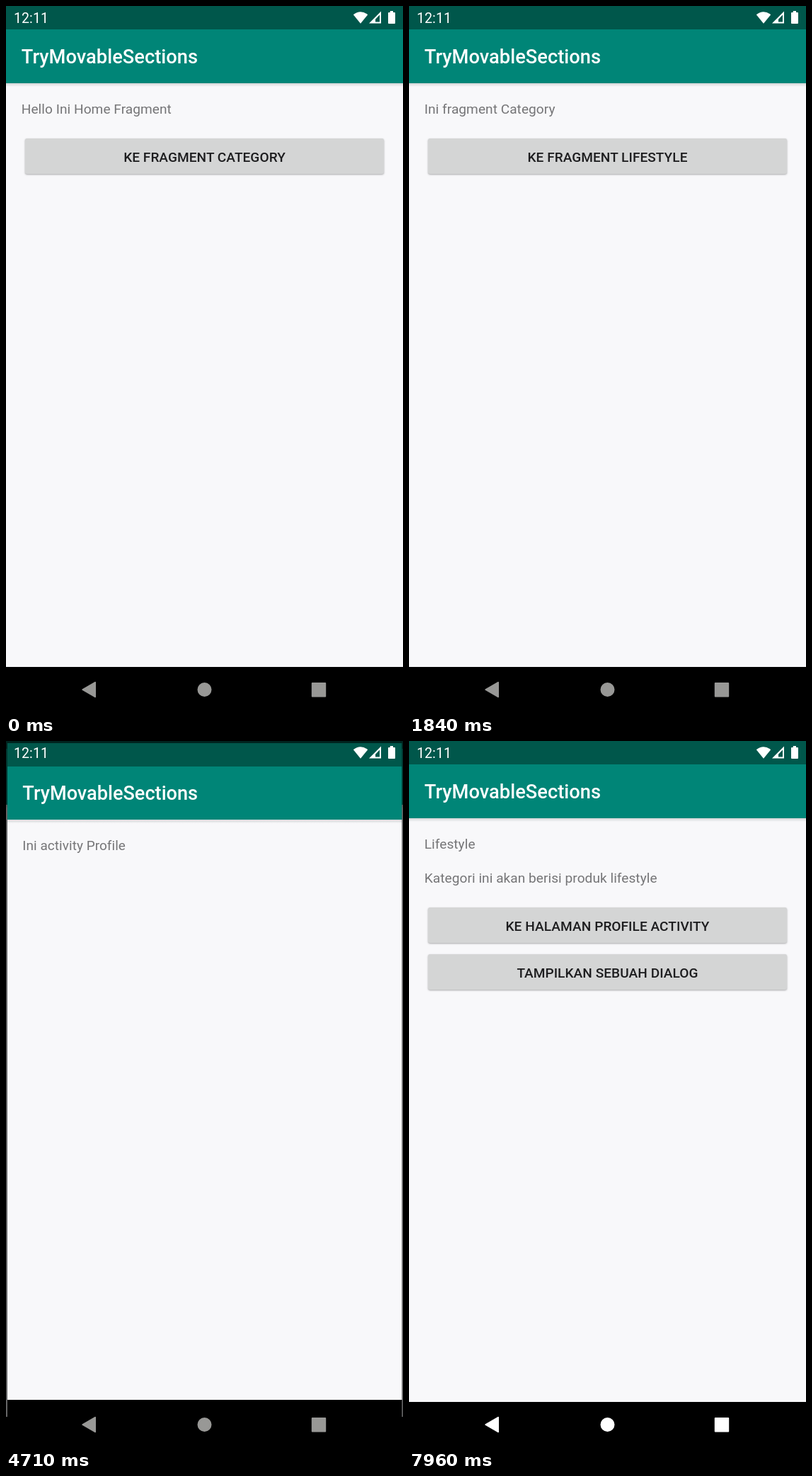
Animation, 561 px wide and 998 px high, one loop 8 s. Source, as an HTML page:

```html
<!DOCTYPE html>
<html lang="id">
<head>
<meta charset="utf-8">
<title>Fragment demo</title>
<style>
  html, body { margin: 0; width: 100%; height: 100%; overflow: hidden; background: #000; }
  .stage {
    position: relative; width: 561px; height: 998px; overflow: hidden; background: #000;
    font: 400 19.09px/26px Roboto, sans-serif; letter-spacing: .05px; color: #757577;
  }
  .stage * { position: absolute; box-sizing: border-box; margin: 0; white-space: nowrap; }

  /* App windows: status bar, app bar, content and navigation bar as one backdrop */
  .window {
    inset: 0;
    background: linear-gradient(#00574b 33px, #008577 0 109px, #f8f8fa 0 933px, #000 0);
  }
  .bar {
    left: 0; top: 33px; width: 100%; height: 76px; padding-left: 21.8px;
    color: #fff; font-weight: 500; font-size: 27.27px; line-height: 78px; letter-spacing: 0;
  }
  .bar::after {
    content: ""; position: absolute; left: 0; top: 100%; width: 100%; height: 5px;
    background: linear-gradient(rgba(0, 0, 0, .14), transparent);
  }
  .page { inset: 0; }
  p { left: 21.8px; top: 132.5px; }
  .second { top: 181px; }

  .button {
    left: 26.8px; top: 187px; width: 507.4px; height: 50px; border-radius: 2.7px;
    background: #d4d5d5; color: #1d1d1f; font-weight: 500; line-height: 53px; text-align: center;
    box-shadow: 0 1px 2.5px rgba(0, 0, 0, .32);
  }
  .button span { inset: 0; }
  .clip { inset: 0; overflow: hidden; border-radius: inherit; }
  .ripple {
    left: 50%; top: 50%; width: 518px; height: 518px; margin: -259px 0 0 -259px;
    border-radius: 50%; background: rgba(0, 0, 0, .14); opacity: 0;
  }

  /* Every animation shares one 8 s loop; --t shifts the press effects to their tap */
  .tap { animation: lift 8s linear calc(var(--t) - 8s) infinite; }
  .tap .ripple {
    animation: grow 8s linear calc(var(--t) - 8s) infinite,
               glow 8s linear calc(var(--t) - 8s) infinite;
  }
  @keyframes lift {
    0%, 6%, 100% { box-shadow: 0 1px 2.5px rgba(0, 0, 0, .32); }
    1.5%, 4% { box-shadow: 0 2px 6px rgba(0, 0, 0, .36); }
  }
  @keyframes grow {
    0% { translate: -80px 0; scale: 0; animation-timing-function: cubic-bezier(0, 0, .2, 1); }
    2.8125%, 100% { translate: 0 0; scale: 1; }
  }
  @keyframes glow {
    0%, 6.25%, 100% { opacity: 0; }
    .94%, 3.75% { opacity: 1; }
  }

  .home { animation: home 8s step-end infinite; }
  .category { animation: category 8s step-end infinite; }
  .lifestyle { animation: lifestyle 8s step-end infinite; }
  @keyframes home { 0% { visibility: visible; } 20.25%, 100% { visibility: hidden; } }
  @keyframes category {
    0% { visibility: hidden; } 20.25% { visibility: visible; } 40.25%, 100% { visibility: hidden; }
  }
  @keyframes lifestyle { 0% { visibility: hidden; } 40.25%, 100% { visibility: visible; } }

  /* Activity opens at 4496 ms and closes at 6360 ms */
  .main { animation: recede 8s linear infinite; }
  .shade { inset: 0; background: #000; opacity: 0; animation: shade 8s linear infinite; }
  .profile { opacity: 0; animation: zoom 8s linear infinite, fade 8s linear infinite; }
  @keyframes recede {
    0% { scale: 1; }
    56.2% { scale: 1; animation-timing-function: cubic-bezier(.3, 0, .8, .15); }
    57.033% { scale: 1.02; animation-timing-function: cubic-bezier(.05, .7, .1, 1); }
    61.2% { scale: 1.05; }
    79.5% { scale: 1.05; animation-timing-function: cubic-bezier(.3, 0, .8, .15); }
    80.333% { scale: 1.03; animation-timing-function: cubic-bezier(.05, .7, .1, 1); }
    84.5%, 100% { scale: 1; }
  }
  @keyframes shade {
    0%, 56.2% { opacity: 0; }
    57.7%, 79.5% { opacity: .6; }
    80.5%, 100% { opacity: 0; }
  }
  @keyframes zoom {
    0% { scale: .85; }
    56.2% { scale: .85; animation-timing-function: cubic-bezier(.3, 0, .8, .15); }
    57.033% { scale: .91; animation-timing-function: cubic-bezier(.05, .7, .1, 1); }
    61.2% { scale: 1; }
    79.5% { scale: 1; animation-timing-function: cubic-bezier(.3, 0, .8, .15); }
    80.333% { scale: .94; animation-timing-function: cubic-bezier(.05, .7, .1, 1); }
    84.5%, 100% { scale: .85; }
  }
  @keyframes fade {
    0%, 56.6% { opacity: 0; }
    57.23%, 79.9% { opacity: 1; }
    80.53%, 100% { opacity: 0; }
  }

  /* System overlay */
  .clock { left: 11px; top: 4.5px; color: #fff; font-size: 19.6px; }
  .system { left: 0; top: 0; }
  .keys { fill: #989896; stroke: #989896; animation: wake 8s step-end infinite; }
  @keyframes wake {
    0% { fill: #989896; stroke: #989896; }
    73%, 100% { fill: #fff; stroke: #fff; }
  }
  .pill {
    left: 46px; top: 937px; width: 144px; height: 56px; border-radius: 28px;
    background: #fff; opacity: 0; animation: pill 8s linear infinite;
  }
  @keyframes pill {
    0%, 73% { opacity: 0; scale: .5; }
    74.5% { opacity: .2; scale: .9; }
    76.5% { opacity: .2; scale: 1; }
    81.8%, 100% { opacity: 0; scale: 1; }
  }
</style>
</head>
<body>
<div class="stage">
  <div class="window main">
    <div class="bar">TryMovableSections</div>
    <div class="page home">
      <p>Hello Ini Home Fragment</p>
      <div class="button tap" style="--t: 1.4s">
        <div class="clip"><div class="ripple"></div></div><span>KE FRAGMENT CATEGORY</span>
      </div>
    </div>
    <div class="page category">
      <p>Ini fragment Category</p>
      <div class="button tap" style="--t: 2.96s">
        <div class="clip"><div class="ripple"></div></div><span>KE FRAGMENT LIFESTYLE</span>
      </div>
    </div>
    <div class="page lifestyle">
      <p>Lifestyle</p>
      <p class="second">Kategori ini akan berisi produk lifestyle</p>
      <div class="button tap" style="--t: 4.22s; top: 235.3px">
        <div class="clip"><div class="ripple"></div></div><span>KE HALAMAN PROFILE ACTIVITY</span>
      </div>
      <div class="button" style="top: 300.7px"><span>TAMPILKAN SEBUAH DIALOG</span></div>
    </div>
  </div>

  <div class="shade"></div>

  <div class="window profile">
    <div class="bar">TryMovableSections</div>
    <p>Ini activity Profile</p>
  </div>

  <div class="clock">12:11</div>
  <div class="pill"></div>
  <svg class="system" width="561" height="998" viewBox="0 0 561 998">
    <g fill="#fff">
      <path d="M490.8 12.2Q501 4.2 511.2 12.2L501 24.8Z"/>
      <path fill-rule="evenodd" d="M513 24.5L530 7.5V24.5ZM522 18.8V22.5H528V12.6Z"/>
      <path d="M542.8 7H547V9H549Q550 9 550 10V24Q550 25 549 25H541Q540 25 540 24V10Q540 9 541 9H542.8Z"/>
    </g>
    <g class="keys" stroke-width="2" stroke-linejoin="round">
      <path d="M108.3 965L126 954.8V975.2Z"/>
      <circle cx="280.5" cy="965" r="9"/>
      <rect x="432.8" y="956" width="18.4" height="18.6"/>
    </g>
  </svg>
</div>
</body>
</html>
```
